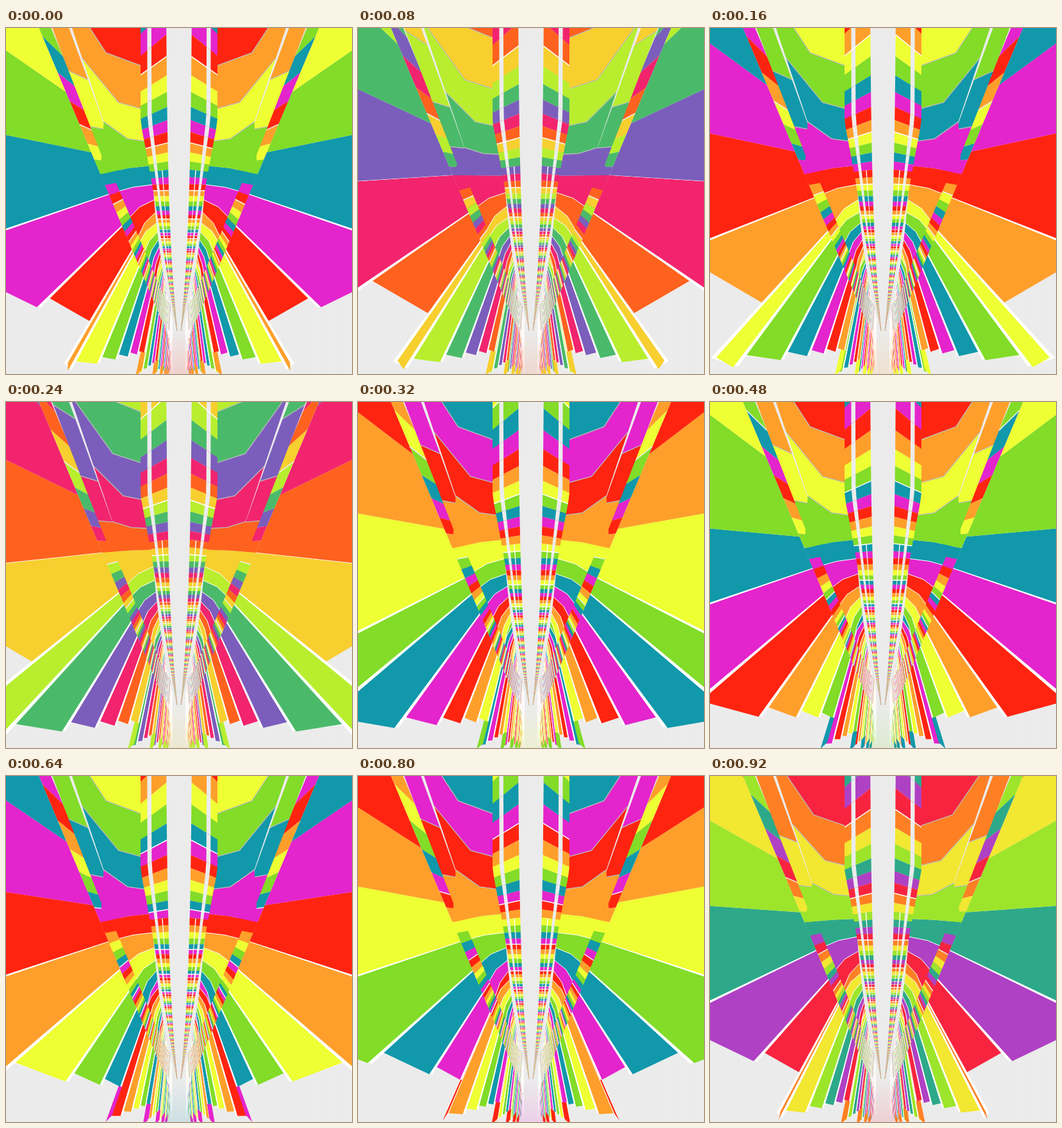
Write an HTML page with a canvas that moves like this. It is 540 by 540 pixels and loops after 0.96 s.

```html
<!DOCTYPE html>
<html>
<head>
<meta charset="utf-8">
<style>
html, body { margin: 0; width: 100%; height: 100%; overflow: hidden; background: #ececec; }
canvas { display: block; width: 540px; height: 540px; }
</style>
</head>
<body>
<canvas id="stage" width="540" height="540"></canvas>
<script>
const ctx = document.getElementById('stage').getContext('2d');
const PALETTE = [[255,159,43], [238,255,51], [130,220,40], [17,152,171], [228,36,204], [255,36,16]];
const STEP = 160, HORIZON = 222, NADIR = 494;
// Extra drop of the lower edge of each of the six bands in a storey
const DROP = [3, 0, 0, 3, 18, 47];

// All geometry uses d, the distance from the mirror axis, and y.
function poly(color, points) {
  ctx.fillStyle = color;
  ctx.beginPath();
  points.forEach(([d, y]) => ctx.lineTo(d, y));
  ctx.fill();
}
function line(color, width, points) {
  ctx.strokeStyle = color;
  ctx.lineWidth = width;
  ctx.beginPath();
  points.forEach(([d, y]) => ctx.lineTo(d, y));
  ctx.stroke();
}
const mod6 = i => (i % 6 + 6) % 6;
function bandColor(index) {
  const i = Math.floor(index), f = index - i;
  const a = PALETTE[mod6(i)], b = PALETTE[mod6(i + 1)];
  return `rgb(${a.map((v, n) => Math.round(v + (b[n] - v) * f))})`;
}

// Slope of the lower edge of band j at height h, seen from the horizon point
const fanSlope = (j, h) => (310 - HORIZON + DROP[j] + (132 + 5.5 * j) * h) / 270;
const onFan = (q, d) => [d, HORIZON + q * d];
const fanStart = q => 298 / Math.max(.7, q + 2.38);
const fanEnd = (q, s) => 272 / Math.max(.15, q + s);
const depth = (base, rate, u) => 1 / Math.max(.0006, base + rate * u);
const taper = (size, w, range) => size * (1 - Math.exp(-w / range));
const silhouette = w => .42 * w + 11 * Math.min(1, w / 40);

function drawFan(k, step) {
  const sUp = -.165 + .087 * k, sLow = -.235 + .083 * k;
  for (let j = 5; j >= 0; j--) {
    const h = j - k + 2;
    let q0 = fanSlope(mod6(j - 1), h);
    const q1 = fanSlope(j, h + 1);
    const strip = (a, b) => [
      onFan(a, fanStart(a)), onFan(a, fanEnd(a, sUp)),
      onFan(b, fanEnd(b, sLow)), onFan(b, fanStart(b))];
    if (q1 > 0) poly('#fff', strip(Math.max(q0, 0), q1 * 1.03));
    if (q0 > 0) q0 *= 1.03;
    poly(bandColor(j + step), strip(q0, q1));
  }
}

function drawEdgeColumn(step, below) {
  for (let n = -24; n < 150; n++) {
    const edge = m => {
      const w = depth(.00291, .000277, m), y = NADIR - w;
      const outer = silhouette(w), inner = outer * .85;
      return [[outer, y], [inner, y + (HORIZON - y) * .15]];
    };
    const top = edge(n - step), low = edge(n + 1 - step);
    if (low[0][1] < -40 || (low[0][1] > 250) !== below) continue;
    poly(bandColor(n + step), [...top, ...low.reverse()]);
    if (mod6(n) === 0) line('#eee', 1.5, top);
  }
}

function wallEdge(j, h) {
  const w = depth(.002315, .000423, h + 4), y = NADIR - w;
  const near = taper(56, w, 190);
  if (y < 208) {
    const bendY = 208 + (y - 208) * 1.16, tipY = 208 + (bendY - 208) * 1.75;
    return [[near, y], [.25 * (NADIR - bendY), bendY], [.338 * (NADIR - tipY), tipY]];
  }
  const q = Math.max(.05, fanSlope(j, h)), far = Math.max(fanStart(q), near);
  const farY = HORIZON + q * far;
  return [[near, y], [near + (far - near) * .45, y + (farY - y) * .28], [far, farY]];
}
function stripEdge(h) {
  const y = Math.min(225, NADIR - depth(.0018, .00058, h + 4)), w = NADIR - y;
  const tilt = Math.max(0, 215 - y) * .0033 * .035 * w;
  return [[.41 * w, y - tilt], [.338 * w, y + tilt]];
}
function drawWall(step) {
  const band = (color, top, low) => {
    if (low[0][1] < -60) return;
    poly(color, [...top, ...[...low].reverse()]);
    if (low[0][1] < 205) line('#bbb', 1.3, low);
    else if (low[0][1] > 235) line('#fff', 1, low);
  };
  const eachBand = visit => {
    for (let g = 7; g >= -2; g--)
      for (let j = 5; j >= 0; j--) visit(j, j + 6 * g - step + 2, bandColor(j + step));
  };
  eachBand((j, h, color) => {
    const top = stripEdge(h);
    if (top[1][1] < 225) band(color, top, stripEdge(h + 1));
  });
  eachBand((j, h, color) => band(color, wallEdge(mod6(j - 1), h), wallEdge(j, h + 1)));
}

function drawCentreColumn(step) {
  for (let n = -12; n < 290; n++) {
    const edge = (m, a, b) => {
      const w = depth(.00228, .000157, m), y = NADIR - w;
      const outer = Math.min(.168 * w, 60), inner = taper(21, w, 170);
      return [a, b].map(f => {
        const d = inner + (outer - inner) * f;
        return [d, y + Math.max(0, 258 - y) * .0035 * (d - 35)];
      });
    };
    const a = n - step, b = a + 1;
    const top = edge(a, 0, 1), low = edge(b, 0, 1);
    if (low[1][1] < -30) continue;
    const piece = (f, g, color) =>
      poly(color, [...edge(a, f, g), ...edge(b, f, g).reverse()]);
    piece(0, 1, bandColor(n + step));
    piece(.58, .74, '#ececec');
    if (a > 8) piece(.3, .35, '#fff');
    const height = low[0][1] - top[0][1];
    if (mod6(n) === 0) line('#fff', Math.min(1.5, height * .3), top);
    else if (a > 20) line('#fff', height * .12, top);
  }
}

function drawGlow(step) {
  const [r, g, b] = bandColor(step + 5).match(/\d+/g);
  const glow = ctx.createLinearGradient(0, 470, 0, 540);
  glow.addColorStop(0, `rgba(${r},${g},${b},0)`);
  glow.addColorStop(1, `rgba(${r},${g},${b},.14)`);
  poly(glow, [[0, 470], [8, 470], [22, 540], [0, 540]]);
}

function draw(now) {
  const step = Math.floor(now % 960 / 40) * 40 / STEP;
  ctx.setTransform(1, 0, 0, 1, 0, 0);
  ctx.fillStyle = '#ececec';
  ctx.fillRect(0, 0, 540, 540);
  ctx.fillStyle = '#e9e9e9';
  for (let x = 0; x < 540; x += 5) ctx.fillRect(x, 0, 1, 540);
  for (const side of [-1, 1]) {
    ctx.setTransform(side, 0, 0, 1, 270, 0);
    for (let g = -5; g <= 2; g++) drawFan(step + 6 * g, step);
    drawEdgeColumn(step, false);
    drawWall(step);
    drawEdgeColumn(step, true);
    drawCentreColumn(step);
    drawGlow(step);
  }
  requestAnimationFrame(() => draw(performance.now() - start));
}
const start = performance.now();
draw(0);
</script>
</body>
</html>
```
